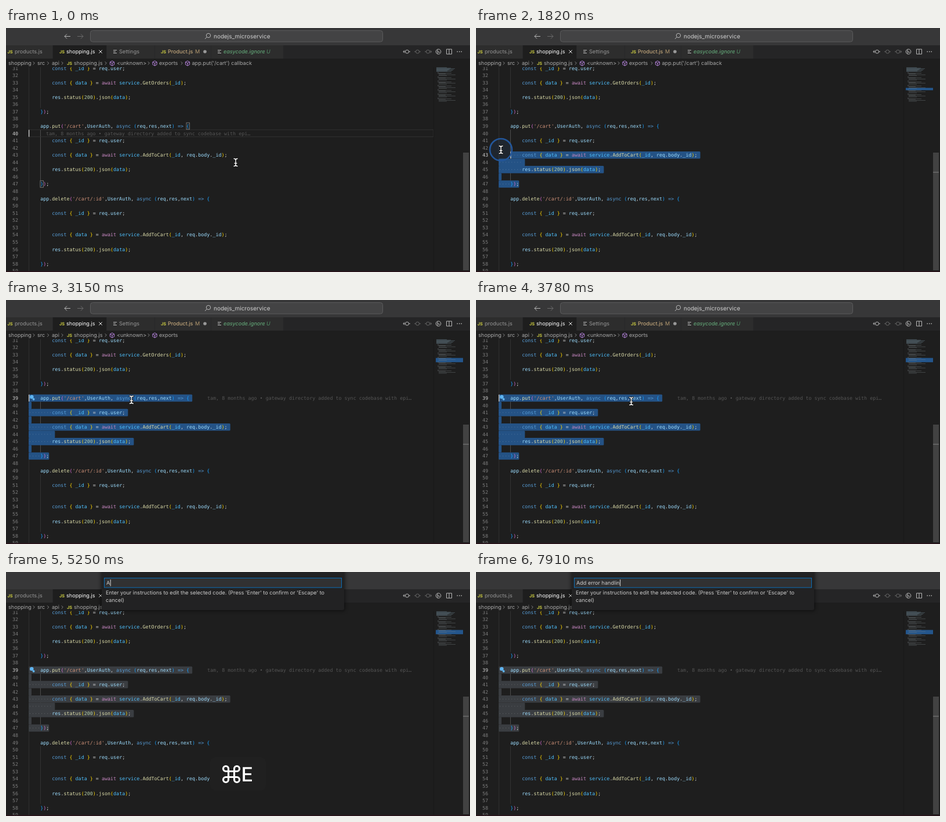
An HTML page that plays this animation: 800 by 423 pixels, repeating every 8 s.

```html
<!DOCTYPE html>
<html lang="en">
<head>
<meta charset="utf-8">
<title>Editing selected code</title>
<style>
html, body { margin: 0; width: 100%; height: 100%; overflow: hidden; background: #1e1e1e; }
svg { display: block; }
text { white-space: pre; text-rendering: geometricPrecision; }
.ui { font: 9.1px Inter, "Open Sans", sans-serif; fill: #a0a0a0; }
.code { font: 8.37px "DejaVu Sans Mono", monospace; fill: #d4d4d4; }
.line { fill: none; stroke: #b8b8b8; stroke-width: 1; }
</style>
</head>
<body>
<svg id="stage" width="800" height="423" viewBox="0 0 800 423">
  <defs>
    <clipPath id="view"><rect y="67.5" width="800" height="354"/></clipPath>
    <filter id="soft" x="-10%" y="-30%" width="120%" height="170%"><feGaussianBlur stdDeviation="3"/></filter>
  </defs>
  <rect width="800" height="423" fill="#1e1e1e"/>
  <g id="editor" clip-path="url(#view)">
    <g id="guides"></g>
    <g id="rows"></g>
    <g id="brackets" fill="none" stroke="#888" stroke-width=".8">
      <rect x="311" y="164.2" width="5.4" height="11.6"/>
      <rect x="59" y="264.7" width="5.4" height="11.6"/>
    </g>
    <g id="code"></g>
    <text id="blame" class="code" style="fill:#555">tam, 8 months ago • gateway directory added to sync codebase with epi…</text>
    <rect id="caret" width="1.3" height="12" fill="#d0d0d0"/>
    <g id="spark" fill="#5fb4f0"><circle cx="44.3" cy="168" r="3.3"/><circle cx="47.6" cy="172" r="2"/></g>
    <g id="map"></g>
    <path d="M737.5 68V422" stroke="#191919"/>
    <rect x="788" y="216" width="10" height="204" fill="#424242"/>
    <rect id="mark" x="788" y="249.5" width="10" height="1.2" fill="#777"/>
  </g>
  <rect y="421.5" width="800" height="1.5" fill="#2b131b"/>
  <rect width="800" height="30" fill="#373738"/>
  <g id="title">
    <path class="line" d="M111 14.5H101M105 10.5L101 14.5L105 18.5"/>
    <path class="line" style="stroke:#6b6b6b" d="M123 14.5H133M129 10.5L133 14.5L129 18.5"/>
    <rect x="145.5" y="4.5" width="504" height="19.5" rx="4" fill="#434344" stroke="#5a5a5b"/>
    <circle class="line" cx="349" cy="13" r="3.7"/>
    <path class="line" d="M346.3 15.7L343 19"/>
  </g>
  <g id="tabs"></g>
  <g id="crumbs"></g>
  <g id="tools" class="line">
    <circle cx="691.5" cy="41" r="3"/><path d="M685 41H688.5M687 38.7L684.8 41L687 43.3M694.5 41H697"/>
    <g stroke="#666"><circle cx="709.5" cy="41" r="3"/><path d="M704 41H706.5M712.5 41H715"/>
      <circle cx="727.5" cy="41" r="3"/><path d="M722 41H724.5M730.5 41H733.5M731.5 38.7L733.7 41L731.5 43.3"/></g>
    <circle cx="745.5" cy="41" r="4.3"/><path d="M744 37.5V44.5M744 40L747 42.5M747 41V43"/>
    <path d="M759.5 36.8H768.5V45.2H759.5ZM764 36.8V45.2"/>
    <path d="M777.5 41H779M781 41H782.5M784.5 41H786" stroke-width="1.4"/>
  </g>
  <g id="palette">
    <rect x="164" y="-6" width="420" height="73" fill="#000" opacity=".55" filter="url(#soft)"/>
    <rect x="165" y="-5" width="418" height="71" rx="3" fill="#222223"/>
    <rect x="169.5" y="10.5" width="409" height="16.5" fill="#313132" stroke="#0a6fb8"/>
    <text id="typed" class="ui" x="173" y="21.6" style="fill:#d0d0d0"></text>
    <rect id="bar" y="13" width="1" height="11.5" fill="#ddd"/>
    <text class="ui" x="172" y="39.4" style="fill:#ccc">Enter your instructions to edit the selected code. (Press 'Enter' to confirm or 'Escape' to</text>
    <text class="ui" x="172" y="52.2" style="fill:#ccc">cancel)</text>
  </g>
  <g id="keys">
    <rect id="plate" y="321" height="58" rx="9" fill="#202020"/>
    <path id="cmd" fill="none" stroke="#fff" stroke-width="3.2" d="M-5-9.5a4.5 4.5 0 1 0-4.5 4.5H9.5a4.5 4.5 0 1 0-4.5-4.5V9.5a4.5 4.5 0 1 0 4.5-4.5H-9.5a4.5 4.5 0 1 0 4.5 4.5Z"/>
    <text id="letter" x="405.5" y="362.5" font-family="Inter, sans-serif" font-size="34" font-weight="500" fill="#fff">E</text>
  </g>
  <g id="mouse">
    <circle id="ring" r="19" fill="#2a62a8" fill-opacity=".12" stroke="#23569a" stroke-width="2.6"/>
    <g fill="none" stroke-linecap="round">
      <path stroke="#111" stroke-width="3" d="M-3-6.5Q0-6.5 0-4Q0-6.5 3-6.5M0-4V4M-3 6.5Q0 6.5 0 4Q0 6.5 3 6.5M-2 1.5H2"/>
      <path stroke="#fff" stroke-width="1.4" d="M-3-6.5Q0-6.5 0-4Q0-6.5 3-6.5M0-4V4M-3 6.5Q0 6.5 0 4Q0 6.5 3 6.5M-2 1.5H2"/>
    </g>
  </g>
</svg>
<script>
const LOOP = 8000, CH = 5.039, LH = 12.56, X0 = 39, END = { line: 47, col: 7 };
const $ = id => document.getElementById(id);
const lineY = n => 170 + (n - 39) * LH;
const show = (id, on) => $(id).setAttribute('visibility', on ? 'visible' : 'hidden');
const set = (el, attrs) => { for (const k in attrs) el.setAttribute(k, attrs[k]); return el; };
function add(parent, tag, attrs, text) {
  const el = set(document.createElementNS('http://www.w3.org/2000/svg', tag), attrs);
  if (text !== undefined) el.textContent = text;
  return parent.appendChild(el);
}

// Source code
const user = '        const { _id } = req.user;';
const cart = '        const { data } = await service.AddToCart(_id, req.body._id);';
const reply = '        res.status(200).json(data);';
const close = '    });';
const source = {
  31: user, 33: cart.replace('AddToCart(_id, req.body._id)', 'GetOrders(_id)'), 35: reply, 37: close,
  39: "    app.put('/cart',UserAuth, async (req,res,next) => {",
  41: user, 43: cart, 44: '        ', 45: reply, 47: close,
  49: "    app.delete('/cart/:id',UserAuth, async (req,res,next) => {",
  51: user, 54: cart, 56: reply, 58: close
};
const lineText = n => source[n] || '';

const pairs = ['#ffd700', '#da70d6', '#179fff'];
const tokens = /\b(const|async)\b|=>|\bawait\b|'[^']*'|\d+|\w+|[{}()]|\s+|./g;
function paint(el, src) {
  let depth = src.includes('app.') ? 1 : src === close ? 3 : 0;
  for (const m of src.matchAll(tokens)) {
    const s = m[0], before = src[m.index - 1], after = src[m.index + s.length];
    let fill = '#d4d4d4';
    if (/^(const|async|=>)$/.test(s)) fill = '#569cd6';
    else if (s === 'await') fill = '#c586c0';
    else if (s[0] === "'") fill = '#ce9178';
    else if (/^\d/.test(s)) fill = '#b5cea8';
    else if (/[{(]/.test(s)) fill = pairs[depth++ % 3];
    else if (/[})]/.test(s)) fill = pairs[--depth % 3];
    else if (/^\w/.test(s)) {
      if (after === '(') fill = '#dcdcaa';
      else fill = before !== '.' && /^(_id|data|service)$/.test(s) ? '#4fc1ff' : '#9cdcfe';
    }
    add(el, 'tspan', { fill }, s);
  }
}

const numbers = {};
for (let n = 31; n < 60; n++) {
  const y = lineY(n) + 3, src = lineText(n);
  numbers[n] = add($('code'), 'text', { class: 'code', x: 21, y, 'text-anchor': 'end' }, n);
  if (src) {
    const start = src.search(/\S|$/);
    paint(add($('code'), 'text', { class: 'code', x: X0 + start * CH, y }), src.slice(start) === '});' ? src.trimStart() && close : src);
  }
}
// Painted lines carry their own indentation
for (const el of $('code').querySelectorAll('text:not([text-anchor])')) el.setAttribute('x', X0);

const guide = (x, a, b, stroke) => add($('guides'), 'path',
  { d: `M${x} ${lineY(a) - LH / 2}V${lineY(b) + LH / 2}`, stroke, 'stroke-width': .8 });
guide(39.5, 31, 59, '#343434');
[[31, 36, '#383838'], [40, 46, '#5a5a5a'], [50, 57, '#383838']].forEach(g => guide(59.5, ...g));

// Minimap
const mapY = n => 68.5 + n * .82;
const mapMark = add($('map'), 'rect', { x: 741, width: 47, fill: '#24568c' });
const shape = [[2, 24], [4, 12], [0, 0], [4, 29], [0, 0], [4, 14], [0, 0], [2, 2], [0, 0]];
for (let n = 0; n < 72; n++) {
  const [indent, len] = n < 9 ? [0, 18 + n * 7 % 16] : shape[(n - 3) % 9];
  if (len) add($('map'), 'rect', { x: 742 + indent, y: mapY(n), width: len, height: .55,
    fill: n < 9 ? '#6f8794' : '#747c80', opacity: .75 });
}

// Tabs and breadcrumbs
const tabs = $('tabs'), crumbs = $('crumbs');
const label = (g, x, y, text, fill, style = '') => add(g, 'text', { class: 'ui', x, y, style: `fill:${fill};${style}` }, text);
const js = (g, x, y) => label(g, x, y, 'JS', '#cbcb41', 'font-size:7.4px;font-weight:700');
const bars = x => add(tabs, 'path', { class: 'line', d: `M${x} 38.5h6M${x} 41h4M${x} 43.5h6` });
add(tabs, 'rect', { y: 30, width: 800, height: 23, fill: '#252526' });
[[0, 80.5], [81, 92], [173.5, 82.5], [256.5, 97], [354, 124]].forEach(([x, width], i) =>
  add(tabs, 'rect', { x, y: 30, width, height: 23, fill: i === 1 ? '#1e1e1e' : '#2d2d2d' }));
js(tabs, 2.5, 43.8);
label(tabs, 15, 44.3, 'products.js', '#969696');
js(tabs, 92, 43.8);
label(tabs, 104, 44.3, 'shopping.js', '#fff');
add(tabs, 'path', { class: 'line', d: 'M160.3 38.3l5.4 5.4m0-5.4l-5.4 5.4', style: 'stroke:#eee' });
bars(185);
label(tabs, 195, 44.3, 'Settings', '#969696');
js(tabs, 267, 43.8);
label(tabs, 279, 44.3, 'Product.js', '#d9b987');
label(tabs, 326, 44.3, 'M', '#b49a70');
add(tabs, 'circle', { cx: 343, cy: 41, r: 2.8, fill: '#9a9a9a' });
bars(365);
label(tabs, 375, 44.3, 'easycode.ignore', '#68b37f', 'font-style:italic');
label(tabs, 449, 44.3, 'U', '#528f66', 'font-style:italic');
label($('title'), 358, 18, 'nodejs_microservice', '#cfcfcf', 'font-size:10px');

function cube(g, x) {
  add(g, 'path', { class: 'line', style: 'stroke:#b180d7',
    d: `M${x} 57l3.6 2v4.4l-3.6 2l-3.6-2v-4.4zM${x - 3.6} 59l3.6 2l3.6-2M${x} 61v4.4` });
}
const arrow = (g, x) => add(g, 'path', { class: 'line', style: 'stroke:#858585', d: `M${x - 1.3} 58.4l2.6 2.6l-2.6 2.6` });
add(crumbs, 'rect', { y: 53, width: 800, height: 14.5, fill: '#1e1e1e' });
[[4, 'shopping'], [54, 'src'], [79, 'api'], [117, 'shopping.js'], [191, '<unknown>'], [264, 'exports']]
  .forEach(([x, s]) => label(crumbs, x, 64.3, s, '#a9a9a9'));
[48, 72.5, 97, 172, 246].forEach(x => arrow(crumbs, x));
js(crumbs, 105, 63.8);
cube(crumbs, 183);
cube(crumbs, 256.5);
const lastCrumb = add(crumbs, 'g', {});
arrow(lastCrumb, 303);
cube(lastCrumb, 313);
label(lastCrumb, 320.5, 64.3, "app.put('/cart') callback", '#a9a9a9');

// Motion
const path = [[70, 396, 233], [840, 78, 271], [1120, 78, 271], [1330, 75, 270], [1680, 75, 268],
  [1750, 58, 222], [1820, 43, 211], [2100, 41, 190], [2450, 40, 171], [2940, 40, 171],
  [3150, 216, 173], [3290, 262, 175], [3640, 262, 175], [4340, 290, 177]];
const ramp = (t, a, b) => Math.min(1, Math.max(0, (t - a) / (b - a)));
function mouseAt(t) {
  const i = path.findIndex(p => p[0] > t);
  if (i === 0) return path[0].slice(1);
  if (i < 0) return path[path.length - 1].slice(1);
  const [ta, xa, ya] = path[i - 1], [tb, xb, yb] = path[i];
  let k = ramp(t, ta, tb);
  if (i === 1) k = k * k * (3 - 2 * k);
  return [xa + (xb - xa) * k, ya + (yb - ya) * k];
}

const phrase = 'Add error handlin';
const strokes = [5250, 5460, 5740, 5950, 6300, 6440, 6650, 6790, 7000, 7070, 7210, 7280, 7350, 7420, 7560, 7840, 7910];

function cursorAt(t) {
  if (t < 1120) return { line: 40, col: 0 };
  if (t < 1680) return END;
  const [x, y] = mouseAt(Math.min(t, 2590) - 70);
  const line = Math.min(47, Math.max(39, 39 + Math.round((y - 170) / LH)));
  return { line, col: Math.min(lineText(line).length, Math.max(0, Math.round((x - X0) / CH))) };
}

let rowState = '';
function drawRows(cur, selecting, focused) {
  const state = [cur.line, cur.col, selecting, focused].join();
  if (state === rowState) return;
  rowState = state;
  const g = $('rows');
  g.replaceChildren();
  for (const n in numbers) numbers[n].style.fill = +n === cur.line ? '#d0d0d0' : '#7c7c7c';
  set($('caret'), { x: X0 + cur.col * CH, y: lineY(cur.line) - 6 });
  if (!selecting) {
    add(g, 'rect', { x: 39, y: lineY(cur.line) - 6.2, width: 698, height: 12.2, fill: 'none', stroke: '#303030' });
    return;
  }
  for (let n = cur.line; n <= 47; n++) {
    const src = lineText(n), from = n === cur.line ? cur.col : 0;
    const to = n === END.line ? END.col : src.length + 1;
    add(g, 'rect', { x: X0 + from * CH, y: lineY(n) - 6.3, width: Math.max(0, to - from) * CH, height: LH + .1,
      rx: 1.5, fill: focused ? '#245285' : '#3a3d41' });
    const indent = src.search(/\S|$/);
    for (let c = from; c < indent; c++)
      add(g, 'circle', { cx: X0 + (c + .5) * CH, cy: lineY(n), r: .55, fill: '#fff', opacity: .22 });
  }
  set(mapMark, { y: mapY(cur.line), height: (48 - cur.line) * .82 });
}

function draw(t) {
  const opened = t >= 4550, selecting = t >= 1750, settled = t >= 2660;
  drawRows(cursorAt(t), selecting, !opened);
  show('caret', !opened);
  show('brackets', t < 1120);
  mapMark.setAttribute('visibility', selecting ? 'visible' : 'hidden');
  show('mark', selecting);
  lastCrumb.setAttribute('visibility', settled ? 'hidden' : 'visible');
  show('spark', settled);
  show('blame', t < 1120 || t >= 2730);
  set($('blame'), t < 1120 ? { x: 69, y: lineY(40) + 3 } : { x: 347, y: lineY(39) + 3 });

  const [x, y] = mouseAt(t);
  set($('mouse'), { transform: `translate(${x} ${y})`, opacity: t < 4550 ? 1 : 0 });
  $('ring').setAttribute('opacity', ramp(t, 1120, 1260) * (1 - ramp(t, 2520, 2700)));

  const pair = t >= 4480;
  $('keys').setAttribute('opacity', ramp(t, 4060, 4270) * (1 - ramp(t, 5260, 5600)));
  set($('plate'), pair ? { x: 352, width: 96 } : { x: 362, width: 76 });
  $('cmd').setAttribute('transform', `translate(${pair ? 388.5 : 400} 350.5)`);
  show('letter', pair);

  show('title', !opened);
  $('palette').style.display = opened ? '' : 'none';
  if (opened) {
    const typed = $('typed');
    typed.textContent = phrase.slice(0, strokes.filter(s => s <= t).length);
    $('bar').setAttribute('x', 173.4 + typed.getComputedTextLength());
    $('bar').setAttribute('opacity', t >= 4970 && t < 5250 ? 0 : 1);
  }
}

const begin = performance.now();
function tick() {
  draw((performance.now() - begin) % LOOP);
  requestAnimationFrame(tick);
}
tick();
</script>
</body>
</html>
```
